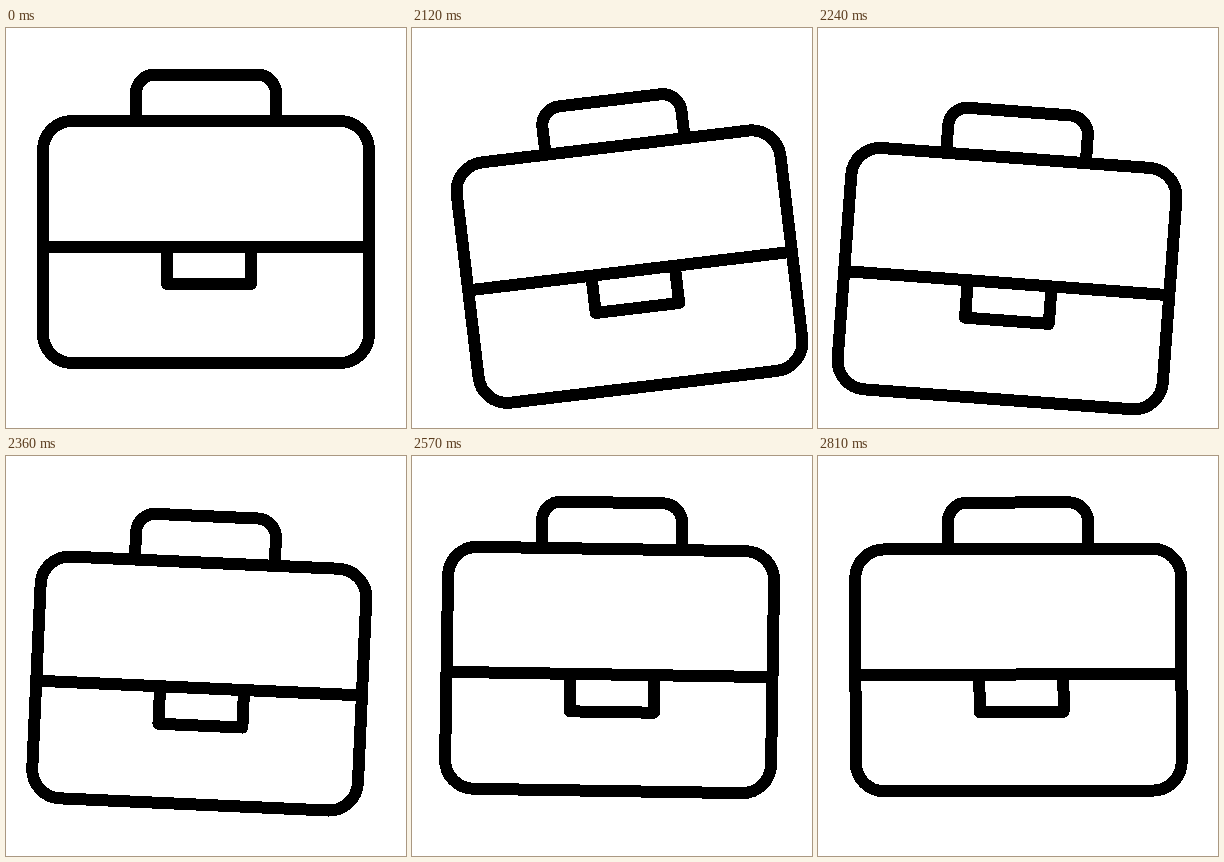
Recreate the animation shown at these times as an HTML page. Size 400 by 400 pixels, loop 2840 ms.

```html
<!DOCTYPE html>
<html lang="en">
<head>
<meta charset="utf-8">
<title>Briefcase</title>
<style>
  html, body { margin: 0; width: 100%; height: 100%; overflow: hidden; background: #fff; }
  svg { display: block; width: 100%; height: 100%; }
</style>
</head>
<body>
<svg viewBox="0 0 400 400" shape-rendering="crispEdges">
  <g id="bag" fill="none" stroke="#000" stroke-width="12" stroke-linejoin="round">
    <path d="M130 93V65.5a19 19 0 0 1 19-19H251a19 19 0 0 1 19 19V93"/>
    <rect x="37" y="93" width="326" height="242" rx="29"/>
    <path d="M37 218.5H363"/>
    <path d="M161 218.5V256H245V218.5"/>
  </g>
</svg>
<script>
  const LOOP = 2840, START = 2030, STEP = 30;
  const bag = document.getElementById('bag');

  const sway = x => (1 - Math.cos(Math.PI * x)) / 2;
  const sink = x => x + x * x - x * x * x;

  // Each key: time in ms, value, easing towards it
  const tilt = [[2000, 0], [2120, -6.8], [2288, 6.8], [2455, -3.9], [2612, 1.9], [2730, -1], [2840, 0]];
  const drop = [[2000, 0], [2220, 37.7, sink], [2458, 0]];

  function valueAt(keys, t) {
    if (t <= keys[0][0]) return keys[0][1];
    for (let i = 1; i < keys.length; i++) {
      const [t0, v0] = keys[i - 1];
      const [t1, v1, ease = sway] = keys[i];
      if (t < t1) return v0 + (v1 - v0) * ease((t - t0) / (t1 - t0));
    }
    return keys[keys.length - 1][1];
  }

  function draw() {
    const t = performance.now() % LOOP;
    // Rest first, then move in steps of 30 ms
    const held = t < START ? 0 : START + Math.floor((t - START) / STEP) * STEP;
    const y = valueAt(drop, held), a = valueAt(tilt, held);
    bag.setAttribute('transform', `translate(0 ${y.toFixed(2)}) rotate(${a.toFixed(3)} 200 66)`);
    requestAnimationFrame(draw);
  }
  draw();
</script>
</body>
</html>
```
